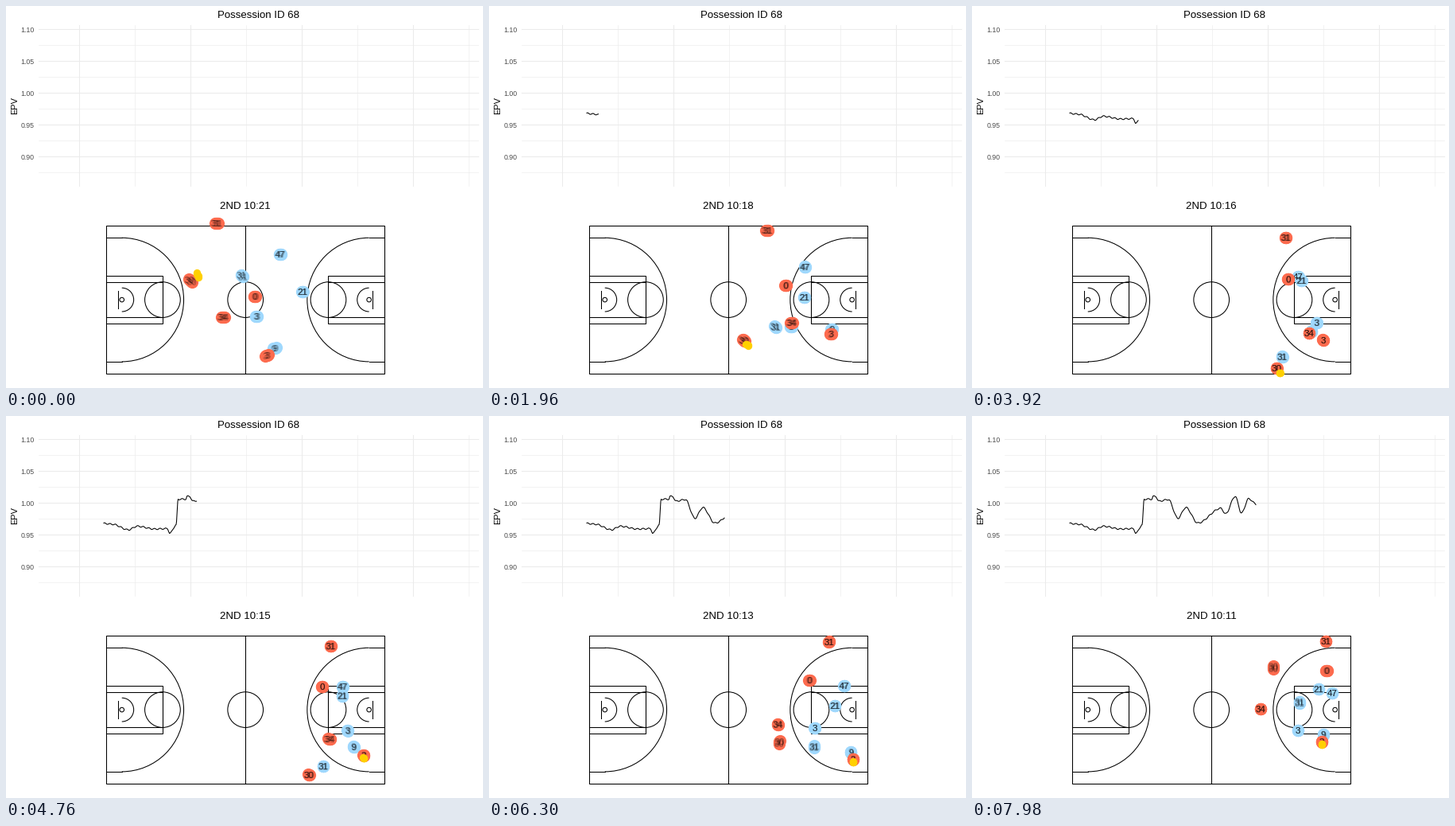
Animation of 600x480 px, one loop 8000 ms. Source, as a matplotlib script:

```python
import numpy as np
import matplotlib.pyplot as plt
from matplotlib.animation import FuncAnimation
from matplotlib.patches import Arc, Circle, Rectangle

W, H, DPI = 600, 480, 100
PT = 72 / DPI                 # points per pixel
INTERVAL, FRAMES, HOLD = 40, 200, 140
RED, BLUE, GOLD, GRID = "#fd6b4e", "#9fd8fd", "#ffd000", "#ebebeb"
TRAIL = np.linspace(-0.3, 0.3, 5)     # tracking samples shown at once
LAST = 57

plt.rcParams["font.family"] = "Liberation Sans"
fig = plt.figure(figsize=(W / DPI, H / DPI), dpi=DPI, facecolor="white")
ax = fig.add_axes([0, 0, 1, 1])
ax.set(xlim=(0, W), ylim=(H, 0))
ax.axis("off")


def label(x, y, s, px, **kw):
    """Text whose digits are centred vertically on y."""
    kw = {"ha": "center", "va": "baseline", **kw}
    return ax.text(x, y + 0.36 * px, s, fontsize=px * PT, **kw)


def line(xs, ys, color="black", px=1.05, **kw):
    return ax.plot(xs, ys, color=color, lw=px * PT, **kw)[0]


# ---- chart -------------------------------------------------------------
def draw_chart():
    for k in range(5):
        y = 29 + 40 * k
        line([41, 594], [y + 20] * 2, GRID, 0.6)
        line([41, 594], [y] * 2, GRID)
        label(35.7, y + 0.8, f"{1.10 - 0.05 * k:.2f}", 8.8, ha="right", color="#4d4d4d")
    for k in range(4):
        x = 92 + 140 * k
        line([x + 70] * 2, [24, 226], GRID, 0.6)
        line([x] * 2, [24, 226], GRID)
    label(317.5, 10.7, "Possession ID 68", 13.2)
    ax.text(11, 125, "EPV", fontsize=11 * PT, rotation=90, ha="center", va="center")


# turning points of the value curve, eased in between
TURNS = np.array([
    (123, 135), (134, 136), (154, 143), (165, 138.5), (187, 142), (203, 141.5),
    (206, 147.5), (214, 137), (216.5, 104.5), (226, 104.5), (228, 101), (231, 101),
    (235, 107), (247, 105), (259, 128.5), (269, 115), (284, 134.5), (313, 116),
    (319, 123), (331, 101), (339, 122), (348, 104), (358, 111),
])


def epv(x):
    k = np.clip(np.searchsorted(TURNS[:, 0], x) - 1, 0, len(TURNS) - 2)
    (x0, y0), (x1, y1) = TURNS[k].T, TURNS[k + 1].T
    u = (x - x0) / (x1 - x0)
    return y0 + (y1 - y0) * u * u * (3 - 2 * u) + 0.8 * np.sin(0.9 * x)


# ---- court -------------------------------------------------------------
FT = 350 / 94
MID, CY = 301.2, 369.1


def draw_court():
    style = dict(ec="black", lw=1.05 * PT, zorder=2)

    def rect(x, w, h):
        ax.add_patch(Rectangle((x, CY - h / 2), w, h, fill=False, **style))

    def circle(x, r):
        ax.add_patch(Circle((x, CY), r, fill=False, **style))

    def arc(x, r, start):
        ax.add_patch(Arc((x, CY), 2 * r, 2 * r, theta1=start, theta2=start + 180, **style))

    rect(MID - 175, 350, 50 * FT)
    line([MID] * 2, [CY - 25 * FT, CY + 25 * FT])
    circle(MID, 6 * FT)
    for side in (-1, 1):
        base = MID + side * 175
        free, hoop = base - side * 19 * FT, base - side * 5.25 * FT
        for width in (16, 12):
            rect(min(base, free), 19 * FT, width * FT)
        circle(free, 6 * FT)
        circle(hoop, 0.75 * FT)
        line([base - side * 4 * FT] * 2, [CY - 3 * FT, CY + 3 * FT])
        start = 90 if side > 0 else -90
        arc(hoop, 4 * FT, start)
        arc(hoop, 77.8, start)
        for y in (CY - 77.8, CY + 77.8):
            line([base, hoop], [y, y])


# ---- motion ------------------------------------------------------------
def path(*points):
    """Smooth curve through evenly timed points, as a function of time."""
    p = np.array(points, float)
    v = np.gradient(p, axis=0)
    spans = len(p) - 1

    def at(s):
        t = s / LAST * spans
        k = np.clip(t.astype(int), 0, spans - 1)
        u = (t - k)[:, None]
        a, b = p[k], p[k + 1]
        return (a + (b - a) * u * u * (3 - 2 * u)
                + u * (1 - u) * (v[k] * (1 - u) - v[k + 1] * u))
    return at


BLUES = {
    "47": path((345, 312), (398, 328), (411, 340), (444, 338), (453, 348)),
    "31": path((297, 339), (361, 404), (391, 441), (408, 423), (412, 360)),
    "21": path((373, 359), (397, 366), (415, 345), (434, 365), (436, 343)),
    "3": path((315, 390), (381, 403), (434, 398), (411, 392), (410, 395)),
    "9": path((338, 430), (432, 406), (427, 409), (455, 424), (442, 400)),
}
REDS = {
    "31": path((265, 273), (351, 282), (396, 291), (424, 284), (445, 283)),
    "0": path((313, 365), (374, 351), (398, 343), (398, 334), (446, 320)),
    "34": path((273, 391), (382, 398), (424, 411), (367, 391), (363, 368)),
    "30": path((232, 345), (322, 421), (384, 455), (365, 423), (379, 316)),
    "3": path((328, 439), (431, 412), (442, 420), (459, 433), (440, 409)),
}
PASS, CATCH = 28.8, 31.3


def ball_at(s):
    """Picked up and dribbled by 30, then passed to 3."""
    settle = np.exp(-s / 3)
    dribble = REDS["30"](s) + np.column_stack([4 + 5 * settle, 6 - 13 * settle])
    u = np.clip((s - PASS) / (CATCH - PASS), 0, 1)[:, None]
    return dribble * (1 - u) + (REDS["3"](s) + (0, 3.5)) * u


def dots(color, px, z):
    return ax.scatter([], [], s=(px * PT) ** 2, c=color, linewidths=0, zorder=z)


class Team:
    def __init__(self, players, color, z):
        self.players = players
        self.dots = dots(color, 15.2, z)
        self.names = [[label(0, 0, name, 11.5, alpha=0.27, zorder=z + 0.5) for _ in TRAIL]
                      for name in players]

    def move(self, s):
        spots = [at(s) for at in self.players.values()]
        self.dots.set_offsets(np.vstack(spots))
        for texts, places in zip(self.names, spots):
            for text, (x, y) in zip(texts, places):
                text.set_position((x, y + 0.36 * 11.5))


draw_chart()
draw_court()
curve = line([], [], zorder=3)
clock = label(301, 250.7, "", 13.2)
teams = [Team(BLUES, BLUE, 4), Team(REDS, RED, 5)]
ball = dots(GOLD, 9.3, 6)


def update(i):
    step = (i * INTERVAL + INTERVAL // 2) // HOLD
    s = step + TRAIL
    xs = np.arange(TURNS[0, 0], 66.6 + 5.1 * step, 0.5)
    curve.set_data(xs, epv(xs))
    clock.set_text(f"2ND 10:{int(21.46 - 0.182 * step):02d}")
    for team in teams:
        team.move(s)
    ball.set_offsets(ball_at(s))
    return []


anim = FuncAnimation(fig, update, frames=FRAMES, init_func=lambda: update(0),
                     interval=INTERVAL, repeat=True, repeat_delay=0)
plt.show()
```
